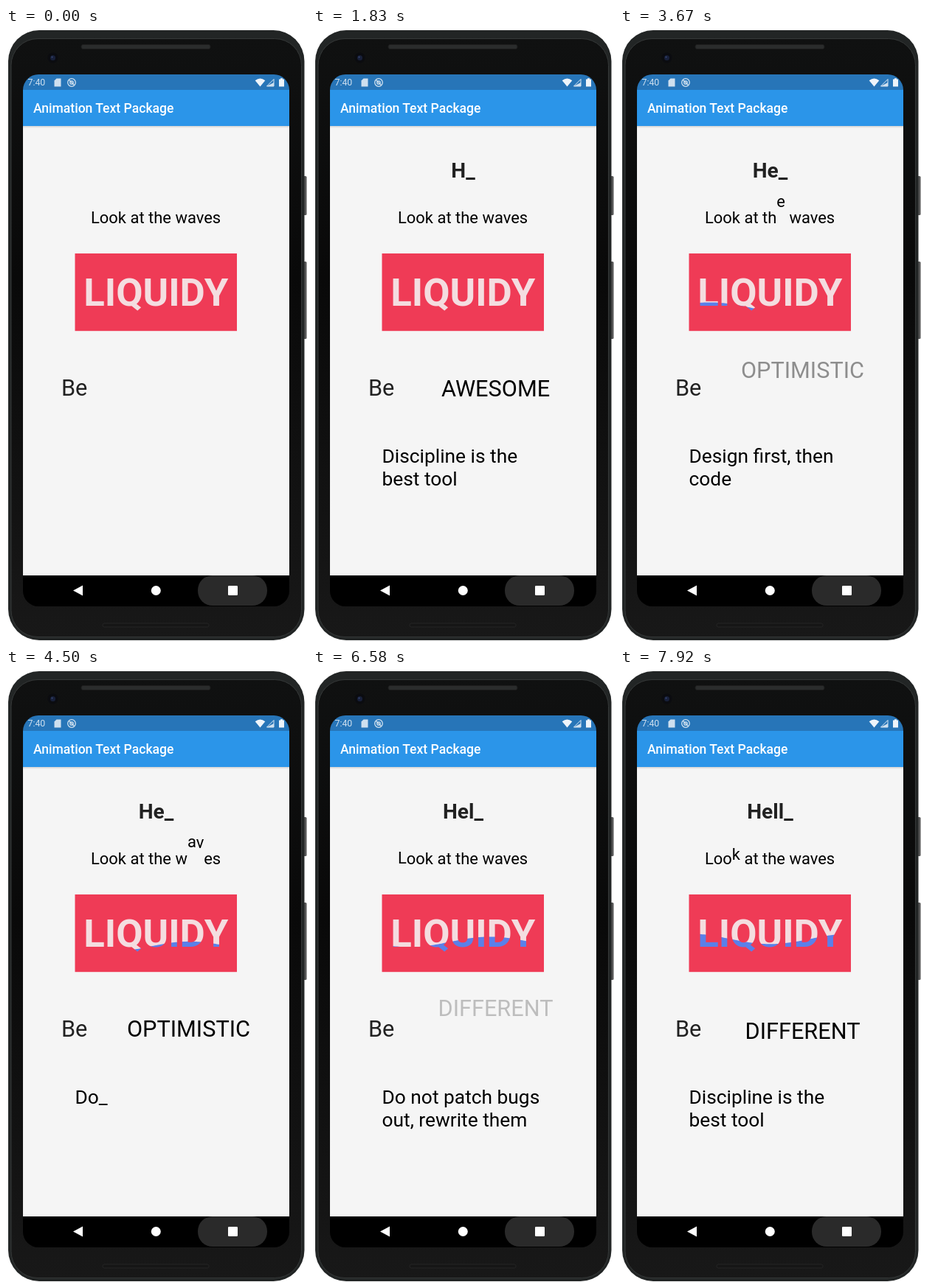
An HTML page for the animation above (8000 ms loop, 408 by 832 pixels).

```html
<!DOCTYPE html>
<html lang="en">
<head>
<meta charset="utf-8">
<title>Animated text</title>
<style>
  html, body { margin: 0; width: 100%; height: 100%; overflow: hidden; background: #fff; }
  svg { position: absolute; left: 0; top: 0; }
  svg, #quote { font-family: Roboto, sans-serif; }
  #quote {
    position: absolute; left: 93.5px; top: 565.8px; width: 219.5px;
    font-size: 26.34px; line-height: 30.7px; white-space: pre-wrap; color: #000;
  }
</style>
</head>
<body>
<svg width="408" height="832" viewBox="0 0 408 832">
  <defs>
    <clipPath id="screen"><rect x="23" y="63" width="361" height="722" rx="21"/></clipPath>
    <mask id="cutout" maskUnits="userSpaceOnUse" x="90" y="300" width="230" height="115">
      <rect x="90" y="300" width="230" height="115" fill="#fff"/>
      <text x="203.3" y="376.6" font-size="52.7" font-weight="700" text-anchor="middle" fill-opacity=".87">LIQUIDY</text>
    </mask>
    <linearGradient id="shadow" x2="0" y2="1">
      <stop stop-color="#000" stop-opacity=".14"/><stop offset="1" stop-color="#000" stop-opacity="0"/>
    </linearGradient>
    <linearGradient id="glass" x2="0" y2="1">
      <stop stop-color="#101111"/><stop offset=".4" stop-color="#090909"/><stop offset="1" stop-color="#181818"/>
    </linearGradient>
  </defs>

  <!-- phone -->
  <g fill="#555">
    <rect x="402" y="201" width="5.5" height="53" rx="1.5"/>
    <rect x="402" y="317" width="5.5" height="105" rx="1.5"/>
  </g>
  <rect x="3" y="3" width="401.5" height="828" rx="42" fill="#222525"/>
  <rect x="7" y="14.5" width="393.5" height="812" rx="36" fill="url(#glass)" stroke="#353838"/>
  <rect x="102" y="22.5" width="175" height="6" rx="2.5" fill="#2a2c2c" stroke="#1c1c1c"/>
  <rect x="131" y="808" width="144" height="5" rx="2" fill="#161616" stroke="#242424"/>
  <circle cx="63.5" cy="40.5" r="7" fill="#0b0c10"/>
  <circle cx="63.5" cy="40.5" r="3.5" fill="#18203a"/>
  <circle cx="62.5" cy="39.5" r="1" fill="#3c4a78"/>

  <g clip-path="url(#screen)">
    <rect x="23" y="133" width="361" height="610" fill="#f5f5f5"/>
    <rect x="23" y="133" width="361" height="3" fill="url(#shadow)"/>
    <rect x="23" y="84" width="361" height="49" fill="#2b95e9"/>
    <rect x="23" y="63" width="361" height="21" fill="#2775b8"/>

    <!-- status bar -->
    <g fill="#cfe0ef">
      <text x="29.5" y="78.3" font-size="12.3">7:40</text>
      <path d="M68.5 68.5h6v11h-9v-8z"/>
      <path d="M344.5 79.5l-6.8-8.3q6.8-5.4 13.6 0z" fill="#eef4fa"/>
      <path d="M363 69.5v9.5h-9.5z" fill="none" stroke="#dbe8f4"/>
      <path d="M363 74v5h-9.5z"/>
      <path d="M370 69.5h2v-1.3h3v1.3h2v10h-7z" fill="#eef4fa"/>
    </g>
    <g fill="none" stroke="#cfe0ef" stroke-width="1.3">
      <circle cx="89" cy="74" r="5.3"/><circle cx="89" cy="74" r="2.2"/><path d="M85.5 70.5l7 7"/>
    </g>
    <text x="37" y="115" font-size="17.56" font-weight="500" fill="#fff">Animation Text Package</text>

    <!-- navigation bar -->
    <rect x="23" y="743" width="361" height="43" fill="#000"/>
    <rect x="260" y="743" width="94" height="41" rx="20" fill="#2a2a2a"/>
    <g fill="#fff">
      <path d="M91 763.5l13-7v14z"/>
      <circle cx="203.3" cy="763.5" r="6.5"/>
      <rect x="301" y="757" width="13" height="13" rx="1.2"/>
    </g>
  </g>

  <!-- animated content -->
  <text id="greeting" x="203.5" y="203.2" font-size="28.1" font-weight="700" text-anchor="middle" fill="#212121"></text>
  <text id="wavy" x="115" y="265.3" font-size="21.95">Look at the waves</text>
  <path id="liquid" fill="#448aff"/>
  <rect x="93.5" y="306" width="219.5" height="105.2" fill="#ef3b56" mask="url(#cutout)"/>
  <text x="75" y="499" font-size="30.7" fill="#212121">Be</text>
  <text id="rotate" x="247.5" font-size="30.7" text-anchor="middle"></text>
</svg>
<div id="quote"><span id="typed"></span><span id="cursor">_</span></div>

<script>
const LOOP = 8000, FRAME = 250 / 3, PAUSE = 1025;
const TYPE_SPEED = 30, BLINKS = 8;
const QUOTES = [
  'Discipline is the best tool',
  'Design first, then code',
  'Do not patch bugs out, rewrite them'
];
const WORDS = ['AWESOME', 'OPTIMISTIC', 'DIFFERENT'];
const PHRASE = 'Look at the waves';

const $ = id => document.getElementById(id);
const clamp = (v, lo = 0, hi = 1) => Math.min(hi, Math.max(lo, v));

// Which item of a paused sequence is playing, and for how long
function playing(durations, time) {
  let i = 0;
  while (time >= durations[i] + PAUSE) {
    time -= durations[i] + PAUSE;
    i = (i + 1) % durations.length;
  }
  return [i, time];
}

function drawGreeting(time) {
  const count = Math.round(time / 2000);
  $('greeting').textContent = count ? 'Hello'.slice(0, count) + '_' : '';
}

function drawWavy(time) {
  const n = PHRASE.length, duration = 300 * n;
  const [, local] = playing([duration], time);
  const rise = Array(n + 1).fill(0);
  if (local < duration) {
    const progress = local / duration * (n / 2 + 0.55);
    const height = 32 * Math.min(progress * 2, 1);
    const even = Math.floor(progress) * 2;
    const odd = Math.floor(progress - 0.5) * 2 + 1;
    if (even < n) rise[even] = -height * Math.abs(Math.sin(progress * Math.PI));
    if (odd > 0 && odd < n) rise[odd] = -height * Math.abs(Math.cos(progress * Math.PI));
  }
  const shifts = [...PHRASE].map((_, i) => (rise[i] - (rise[i - 1] || 0)).toFixed(2));
  $('wavy').setAttribute('dy', shifts.join(' '));
}

function drawLiquid(time) {
  const left = 94, width = 218.5;
  const base = 389.4 - time / 20000 * 61.7;
  let d = `M${left} 410`;
  for (let x = 0; x <= width; x += 2) {
    d += `L${left + x} ${base + 7 * Math.sin(2 * Math.PI * (x / width + time / 2000))}`;
  }
  $('liquid').setAttribute('d', d + `V410Z`);
}

function drawRotate(time) {
  const [i, local] = playing(WORDS.map(() => 2000), time);
  const enter = clamp(local / 800), leave = clamp((local - 1400) / 600);
  const word = $('rotate');
  word.textContent = WORDS[i];
  word.setAttribute('y', 499 + 33.2 * (enter - 1 + leave));
  word.setAttribute('opacity', (1 - (1 - enter) ** 1.67) * (1 - leave ** 1.67));
}

function drawQuote(time) {
  const durations = QUOTES.map(q => (q.length + BLINKS) * TYPE_SPEED);
  const [i, local] = playing(durations, time);
  const count = Math.round(local / TYPE_SPEED), extra = count - QUOTES[i].length;
  const blinkOff = extra > 0 && extra % 2;
  const done = local >= durations[i];
  $('typed').textContent = QUOTES[i].slice(0, count);
  $('cursor').style.visibility = count && !blinkOff && !done ? 'visible' : 'hidden';
  $('cursor').style.display = done ? 'none' : '';
}

// The app stalls briefly while starting up
const appTime = t => t < 499 ? clamp((t - 80) / 5, 0, 35) : t - 420;

const start = performance.now();
function draw() {
  const elapsed = (performance.now() - start) % LOOP;
  const time = appTime(Math.floor((elapsed + 4) / FRAME) % 96 * FRAME);
  for (const part of [drawGreeting, drawWavy, drawLiquid, drawRotate, drawQuote]) part(time);
  requestAnimationFrame(draw);
}
draw();
</script>
</body>
</html>
```
